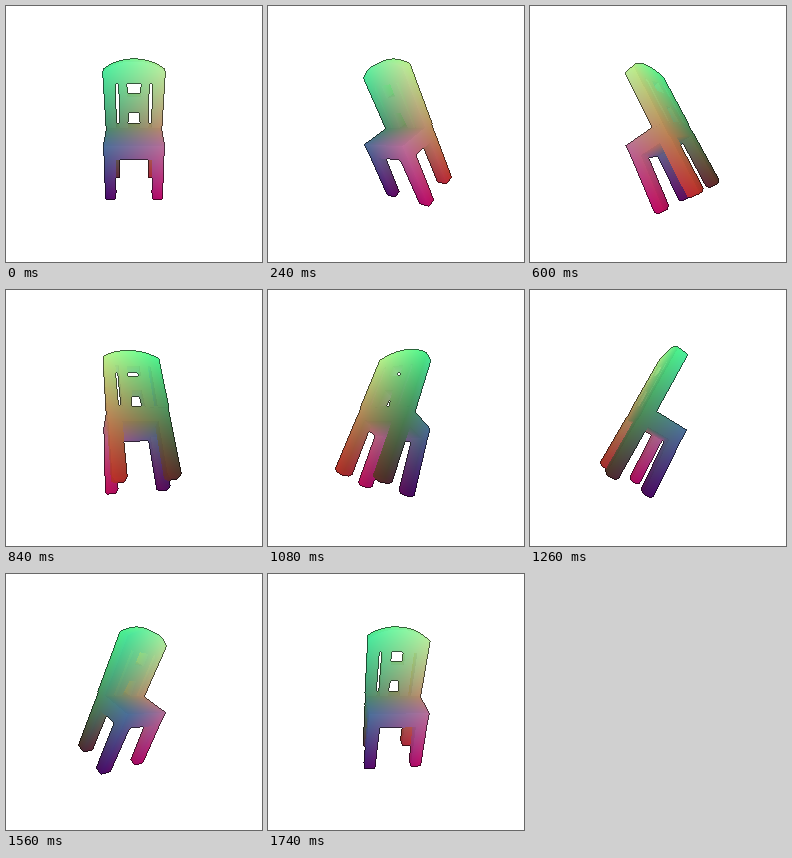
An HTML page with a canvas that plays this animation: 256 px wide and 256 px high, repeating every 1.8 s.

```html
<!DOCTYPE html>
<html lang="en">
<head>
<meta charset="utf-8">
<title>Turning chair</title>
<style>
  html, body { margin: 0; width: 100%; height: 100%; overflow: hidden; background: #fff; }
  canvas { display: block; width: 256px; height: 256px; }
</style>
</head>
<body>
<canvas id="stage" width="256" height="256"></canvas>
<script>
const SIZE = 256, MID = 128, CAMERA = 260;
const LOOP = 1800, STEP = 60, STEPS = LOOP / STEP;
const TILT = Math.PI / 6;

const ctx = document.getElementById('stage').getContext('2d');
const image = ctx.createImageData(SIZE, SIZE);
const px = image.data;
const depth = new Float32Array(SIZE * SIZE);
const faces = [];

// Lean the upright chair forward around its x axis.
function lean([x, y, z]) {
  const c = Math.cos(TILT), s = Math.sin(TILT);
  return [x, y * c - z * s, z * c + y * s];
}

function normal(a, b, c) {
  const u = b.map((v, i) => v - a[i]), w = c.map((v, i) => v - a[i]);
  const n = [u[1] * w[2] - u[2] * w[1], u[2] * w[0] - u[0] * w[2], u[0] * w[1] - u[1] * w[0]];
  const len = Math.hypot(...n) || 1;
  return n.map(v => v / len);
}

// Solid between two rectangles [x0, x1, z0, z1]; the top may slope along x.
function solid(low, yLow, high, yLeft, yRight = yLeft) {
  const ring = ([x0, x1, z0, z1], a, b) =>
    [[x0, a, z0], [x1, b, z0], [x1, b, z1], [x0, a, z1]].map(lean);
  const p = ring(low, yLow, yLow), q = ring(high, yLeft, yRight);
  faces.push(p, q);
  for (let i = 0; i < 4; i++) {
    const j = (i + 1) % 4;
    faces.push([p[i], p[j], q[j], q[i]]);
  }
}

function block(x0, x1, y0, y1, z0, z1) {
  const r = [x0, x1, z0, z1];
  solid(r, y0, r, y1);
}

// Feet and tops are rectangles on the right side, mirrored for the left.
function leg(side, foot, top) {
  const rect = ([x0, x1, z0, z1], inset = 0) => {
    const e = [side * (x0 + inset), side * (x1 - inset)].sort((m, n) => m - n);
    return [...e, z0 + inset, z1 - inset];
  };
  solid(rect(foot), -66.5, rect(top), -14);
  solid(rect(foot, 2), -69, rect(foot), -66.5);
}

function buildChair() {
  const back = [-23.5, -12], half = 29.5;
  block(-29, 29, -16, 0, -23, 21.5);
  for (const side of [-1, 1]) {
    leg(side, [19, 30.5, 12.5, 22.5], [17.5, 29, 10.5, 21.5]);
    leg(side, [16.5, 28.5, -24, -12.5], [16.5, 28.8, -23.5, -12]);
    const span = (a, b) => side < 0 ? [-b, -a] : [a, b];
    block(...span(18.3, half), -2, 47.5, ...back);
    block(...span(6.5, 15), -2, 47.5, ...back);
    // Lower opening narrows towards its top.
    solid([...span(6.3, 6.5), ...back], 0, [...span(4.8, 6.5), ...back], 17.5);
  }
  block(-6.5, 6.5, 17.5, 34.5, ...back);

  const arch = x => 69 - 9.5 * Math.pow(Math.abs(x) / half, 2.2);
  const strips = 16;
  for (let i = 0; i < strips; i++) {
    const x0 = half * (2 * i / strips - 1), x1 = half * (2 * (i + 1) / strips - 1);
    const r = [x0, x1, ...back];
    solid(r, 47.5, r, arch(x0), arch(x1));
  }
}

function triangle(a, b, c, light) {
  const area = (b.x - a.x) * (c.y - a.y) - (b.y - a.y) * (c.x - a.x);
  if (Math.abs(area) < 1e-6) return;
  const first = (...v) => Math.max(0, Math.floor(Math.min(...v)));
  const last = (...v) => Math.min(SIZE - 1, Math.ceil(Math.max(...v)));
  const xMin = first(a.x, b.x, c.x), xMax = last(a.x, b.x, c.x);
  const yMin = first(a.y, b.y, c.y), yMax = last(a.y, b.y, c.y);
  for (let y = yMin; y <= yMax; y++) {
    for (let x = xMin; x <= xMax; x++) {
      const X = x + 0.5, Y = y + 0.5;
      const u = ((b.x - X) * (c.y - Y) - (b.y - Y) * (c.x - X)) / area;
      const v = ((c.x - X) * (a.y - Y) - (c.y - Y) * (a.x - X)) / area;
      const w = 1 - u - v;
      if (u < 0 || v < 0 || w < 0) continue;
      const near = u * a.w + v * b.w + w * c.w, i = y * SIZE + x;
      if (near <= depth[i]) continue;
      depth[i] = near;
      const at = k => (u * a.p[k] * a.w + v * b.p[k] * b.w + w * c.p[k] * c.w) / near;
      px[i * 4] = light * (130 + 1.9 * at(0));
      px[i * 4 + 1] = light * (130 + 1.75 * at(1));
      px[i * 4 + 2] = light * (125 + 1.55 * at(2));
    }
  }
}

// Dark rim on every covered pixel that touches the background.
function outline() {
  for (let y = 1; y < SIZE - 1; y++) {
    for (let x = 1; x < SIZE - 1; x++) {
      const i = y * SIZE + x;
      if (!depth[i]) continue;
      if (depth[i - 1] && depth[i + 1] && depth[i - SIZE] && depth[i + SIZE]) continue;
      for (let k = 0; k < 3; k++) px[i * 4 + k] *= 0.4;
    }
  }
}

function draw(angle) {
  const c = Math.cos(angle), s = Math.sin(angle);
  const turn = ([x, y, z]) => [x * c - z * s, y, x * s + z * c];
  const project = p => {
    const [x, y, z] = turn(p), w = CAMERA / (CAMERA - z);
    return { x: MID + x * w, y: MID - y * w, w, p };
  };
  px.fill(255);
  depth.fill(0);
  for (const f of faces) {
    const n = turn(normal(f[0], f[1], f[2]));
    const light = 0.93 + 0.09 * Math.abs(n[2]);
    const [p, q, r, t] = f.map(project);
    triangle(p, q, r, light);
    triangle(p, r, t, light);
  }
  outline();
  ctx.putImageData(image, 0, 0);
}

buildChair();
const start = performance.now();
let shown = -1;

function tick() {
  const step = Math.floor(((performance.now() - start) % LOOP) / STEP);
  if (step !== shown) {
    shown = step;
    draw(step / STEPS * 2 * Math.PI);
  }
  requestAnimationFrame(tick);
}
tick();
</script>
</body>
</html>
```
